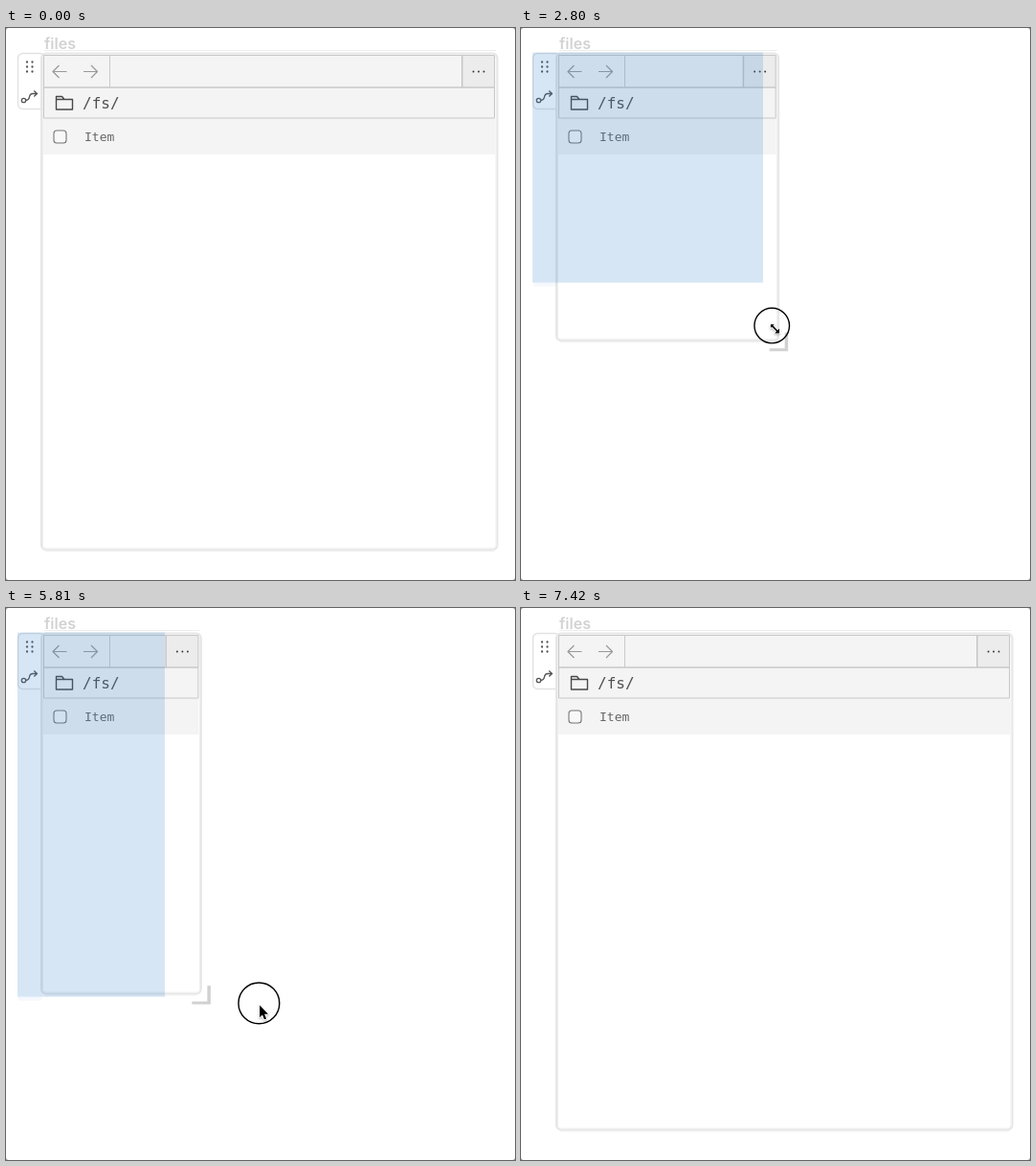
These frames come from a looping animation (532x576 px, 7.7 s). An HTML page with a canvas:

```html
<!DOCTYPE html>
<html lang="en">
<head>
<meta charset="utf-8">
<title>Resizing a file panel</title>
<style>
  html, body { margin: 0; width: 532px; height: 576px; overflow: hidden; background: #fff; }
  canvas { display: block; }
</style>
</head>
<body>
<canvas id="stage" width="532" height="576"></canvas>
<script>
const ctx = document.getElementById('stage').getContext('2d');
const LOOP = 7700, STEP = 70;
const ENTER = 210, LEAVE = 7420;
const LARGE = { right: 514, bottom: 545 }, SMALL = { right: 166, bottom: 405 };
const CELL = { right: 87, bottom: 140 };

// Each move eases the pointer on to a point; bend bows the path vertically
const ORIGIN = { x: 326, y: 571 };
const MOVES = [
  { start: 210, end: 770, x: 505, y: 541, bend: -24 },
  { start: 1400, end: 1680, x: 512, y: 545.5 },
  { start: 2085, end: 2870, x: 261, y: 295, bend: 52 },
  { start: 2870, end: 3220, x: 167, y: 454 },
  { start: 3710, end: 4130, x: 175, y: 353 },
  { start: 4270, end: 4545, x: 302, y: 308 },
  { start: 4545, end: 5110, x: 161, y: 399.5, bend: -11 },
  { start: 5700, end: 6320, x: 457, y: 436.5 },
  { start: 6320, end: 6580, x: 458, y: 466 },
  { start: 6580, end: 6860, x: 492, y: 518 },
  { start: 6930, end: 7350, x: 291, y: 571 }
];
const CLICK = { press: 980, release: 1120 };
const RESIZES = [
  { hover: 1470, press: 1890, drag: 2100, release: 3570, size: SMALL },
  { hover: 5180, press: 5600, drag: 5740, release: 6930, size: LARGE }
];

const between = (t, a, b) => t >= a && t < b;
const easeOut = u => 1 - (1 - u) ** 2.2;

function pointerAt(t) {
  let { x, y } = ORIGIN;
  for (const move of MOVES) {
    if (t <= move.start) break;
    const u = Math.min(1, (t - move.start) / (move.end - move.start));
    x += (move.x - x) * easeOut(u);
    y += (move.y - y) * easeOut(u) + (move.bend || 0) * Math.sin(Math.PI * u);
  }
  return { x, y };
}

function rect(x, y, w, h, fill) {
  ctx.fillStyle = fill;
  ctx.fillRect(x, y, w, h);
}
function frame(x, y, w, h, radius, stroke, width = 1, fill) {
  ctx.beginPath();
  ctx.roundRect(x, y, w, h, radius);
  if (fill) { ctx.fillStyle = fill; ctx.fill(); }
  ctx.strokeStyle = stroke;
  ctx.lineWidth = width;
  ctx.stroke();
}
function line(d, stroke, width) {
  ctx.strokeStyle = stroke;
  ctx.lineWidth = width;
  ctx.stroke(new Path2D(d));
}
function dot(x, y, r, fill) {
  ctx.beginPath();
  ctx.arc(x, y, r, 0, 7);
  ctx.fillStyle = fill;
  ctx.fill();
}
function ring(x, y, r, stroke, width) {
  ctx.beginPath();
  ctx.arc(x, y, r, 0, 7);
  ctx.strokeStyle = stroke;
  ctx.lineWidth = width;
  ctx.stroke();
}
function text(str, x, y, font, fill) {
  ctx.font = font;
  ctx.fillStyle = fill;
  ctx.fillText(str, x, y);
}

function drawSideTab() {
  frame(12.5, 26.5, 28, 58, 5, '#e2e2e2', 1.5, '#fff');
  for (let i = 0; i < 6; i++) dot(22 + 5.5 * (i % 2), 35.5 + 5 * (i >> 1), 1.15, '#555');
  ring(18.5, 75.5, 2.2, '#555', 1.3);
  line('M20.7 75.5C27 75.5 22 68.5 28 68.5H32M29.3 65.5L32.5 68.5L29.3 71.5', '#555', 1.3);
}

function drawPanel({ right, bottom }) {
  const inner = right - 3;
  rect(40, 23, right - 42, 1, '#ececec');
  text('files', 40, 22, '600 16px Inter, sans-serif', '#d2d2d2');
  drawSideTab();
  frame(37, 26.5, right - 37.5, bottom - 27, 5, '#e6e6e6', 2, '#fff');
  frame(38.5, 28, right - 40.5, bottom - 30, 3, '#efefef');
  rect(41, bottom + .5, right - 45, 1, '#f0f0f0');

  ctx.save();
  ctx.beginPath();
  ctx.rect(39, 28, inner - 38.5, bottom - 30);
  ctx.clip();
  rect(39, 28, inner - 39, 104, '#f4f4f4');
  rect(inner - 34, 29, 34, 33, '#ececec');
  frame(39.5, 28.5, inner - 40, 33.5, 0, '#c8c8c8');
  frame(39.5, 62, inner - 40, 32, 0, '#c8c8c8');
  rect(108, 29, 1, 33, '#cacaca');
  rect(inner - 35, 29, 1.5, 33, '#c6c6c6');
  line('M63.5 45.5H49M55.5 39L49 45.5L55.5 52M81 45.5H95.5M89 39L95.5 45.5L89 52', '#999', 1.2);
  for (const dx of [-5.5, 0, 5.5]) dot(inner - 17 + dx, 45.5, .95, '#333');
  line('M52.5 74.5V71.5H58.5L61 74.5M52.5 74.5H69.5V85H52.5Z', '#484848', 1.4);
  text('/fs/', 80, 84, '16px "DejaVu Sans Mono", monospace', '#505050');
  frame(50, 107, 13, 13, 3, '#777', 1.1, '#f8f8f8');
  text('Item', 82, 118, '13px "DejaVu Sans Mono", monospace', '#666');
  ctx.restore();
}

function drawPreview(panel) {
  const snap = side =>
    SMALL[side] + CELL[side] * Math.round((panel[side] - SMALL[side]) / CELL[side]);
  const bottom = snap('bottom') + .7;
  rect(13, bottom, 24, 4, 'rgba(61,122,204,.05)');
  rect(12, 25.5, snap('right') - 12, bottom - 25.5, 'rgba(53,128,202,.2)');
}

function drawGrip({ right, bottom }, strength) {
  const fill = `rgba(0,0,0,${.18 * strength})`;
  rect(right + 6, bottom - 9, 3.5, 16.5, fill);
  rect(right - 10, bottom + 7.5, 19.5, 3, fill);
}

function drawPointer({ x, y }, resizing, pressed) {
  if (pressed) ring(x, y, resizing ? 18.3 : 21.4, '#000', 1.4);
  const shape = new Path2D(resizing
    ? 'M-4.5 -4.5H-.8L-2 -3.3L2.8 1.6L4.6 -.2V4.6H-.2L1.6 2.8L-3.3 -2L-4.5 -.8Z'
    : 'M0 0V12.6L2.8 10L4.8 14.7L6.9 13.8L4.9 9.2H8.8Z');
  ctx.save();
  ctx.translate(x + (resizing ? 3.2 : .8), y + (resizing ? 3.2 : 2.2));
  ctx.shadowColor = 'rgba(0,0,0,.3)';
  ctx.shadowBlur = 2;
  ctx.shadowOffsetY = 1;
  ctx.strokeStyle = '#fff';
  ctx.lineWidth = 1.8;
  ctx.stroke(shape);
  ctx.shadowColor = 'transparent';
  ctx.fillStyle = '#000';
  ctx.fill(shape);
  ctx.restore();
}

function draw(t) {
  const pointer = pointerAt(t);
  const active = RESIZES.find(r => between(t, r.hover, r.release));
  const done = RESIZES.filter(r => t >= r.release).pop();
  const dragging = active && t >= active.drag;
  const pressed = between(t, CLICK.press, CLICK.release) || active && t >= active.press;
  let panel = done ? done.size : LARGE;
  let resizing = Boolean(active);
  if (dragging) {
    // The panel trails the pointer by one step
    const { x, y } = pointerAt(t - STEP);
    panel = { right: x + 3, bottom: y - 1.5 };
    resizing = Math.hypot(pointer.x - x, pointer.y - y) < 30;
  }

  rect(0, 0, 532, 576, '#999');
  ctx.beginPath();
  ctx.roundRect(0, 0, 532, 576, 3);
  ctx.fillStyle = '#fff';
  ctx.fill();
  drawPanel(panel);
  if (dragging) drawPreview(panel);
  if (active) drawGrip(panel, Math.min(1, (t - active.hover + STEP) / 280));
  if (between(t, ENTER, LEAVE)) drawPointer(pointer, resizing, pressed);
}

function tick(now) {
  draw(Math.floor((now % LOOP) / STEP) * STEP);
  requestAnimationFrame(tick);
}
ctx.lineJoin = 'round';
requestAnimationFrame(tick);
</script>
</body>
</html>
```
